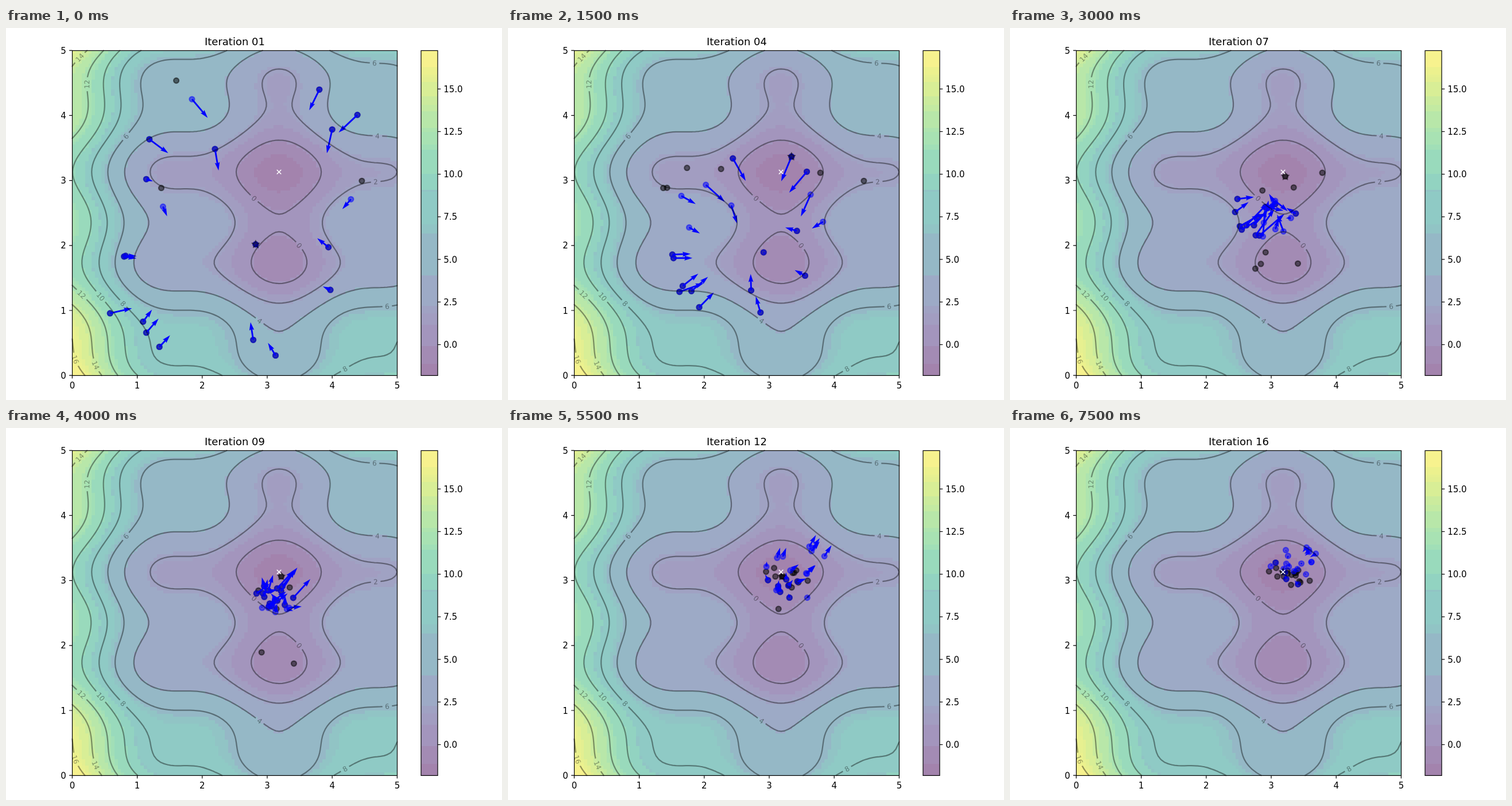
These frames come from a looping animation (864x648 px, 8000 ms). An HTML page with a canvas:

```html
<!DOCTYPE html>
<html lang="en">
<head>
<meta charset="utf-8">
<title>Particle swarm</title>
<style>
  html, body { margin: 0; width: 100%; height: 100%; overflow: hidden; background: #fff; }
  canvas, svg { position: absolute; left: 0; top: 0; display: block; }
  text { font: 15px "DejaVu Sans", sans-serif; fill: #000; }
  #title { font-size: 18px; text-anchor: middle; }
  #labels text { font-size: 12px; text-anchor: middle; fill-opacity: .4; }
  #frame * { fill: none; stroke: #000; stroke-width: 1.2; }
  .dot { fill-opacity: .5; stroke-opacity: .5; stroke-width: 2.25; }
  #best circle { fill: #000; stroke: #000; }
  #swarm circle { fill: #00f; stroke: #00f; }
  #arrows { fill: #00f; }
  #star { stroke: #000; fill-opacity: .4; stroke-opacity: .4; stroke-width: 1.5; stroke-linejoin: bevel; }
  #contours { fill: none; stroke: #000; stroke-opacity: .4; stroke-width: 2.25; stroke-linecap: round; }
  #goal { stroke: #fff; stroke-width: 1.5; }
</style>
</head>
<body>
<canvas id="map" width="864" height="648"></canvas>
<svg width="864" height="648" viewBox="0 0 864 648">
  <mask id="gaps" maskUnits="userSpaceOnUse" x="0" y="0" width="864" height="648">
    <rect width="864" height="648" fill="#fff"/>
  </mask>
  <g id="best"></g>
  <g id="swarm"></g>
  <g id="arrows"></g>
  <path id="star"/>
  <path id="goal"/>
  <path id="contours" mask="url(#gaps)"/>
  <g id="labels"></g>
  <g id="frame"></g>
  <g id="ticks"></g>
  <text id="title" x="398.5" y="30"></text>
</svg>
<script>
const $ = id => document.getElementById(id);
const LEFT = 115.4, BOTTOM = 605.2, SIZE = 566, UNIT = SIZE / 5;
const TOP = BOTTOM - SIZE;
const BAR_X = 723, BAR_W = 29;
const GRID = 100, COUNT = 20, STEPS = 16, STEP_MS = 500;

const px = x => LEFT + x * UNIT;
const py = y => BOTTOM - y * UNIT;
const at = i => i * 5 / (GRID - 1);
const f = (x, y) => (x - 3.14) ** 2 + (y - 2.72) ** 2 + Math.sin(3 * x + 1.41) + Math.sin(4 * y - 1.73);
const gradient = (x, y) => [2 * (x - 3.14) + 3 * Math.cos(3 * x + 1.41), 2 * (y - 2.72) + 4 * Math.cos(4 * y - 1.73)];

function add(parent, tag, attrs, text) {
  const el = document.createElementNS('http://www.w3.org/2000/svg', tag);
  for (const k in attrs) el.setAttribute(k, attrs[k]);
  if (text !== undefined) el.textContent = text;
  return parent.appendChild(el);
}

// Height field and its range
const z = [];
let low = Infinity, high = -Infinity, goal;
for (let j = 0; j < GRID; j++) {
  z.push([]);
  for (let i = 0; i < GRID; i++) {
    const v = f(at(i), at(j));
    z[j].push(v);
    if (v < low) { low = v; goal = [at(i), at(j)]; }
    high = Math.max(high, v);
  }
}

// Viridis as a polynomial, half transparent on white, in coarse colour bands
const VIRIDIS = [
  [0.27773, 0.10509, -0.33086, -4.63423, 6.22827, 4.77638, -5.43546],
  [0.00541, 1.40461, 0.21485, -5.79910, 14.17993, -13.74515, 4.64585],
  [0.33410, 1.38459, 0.09510, -19.33244, 56.69055, -65.35303, 26.31244]
];
function makePalette() {
  const groups = {}, keys = [];
  for (let i = 0; i < 256; i++) {
    const rgb = VIRIDIS.map(c => 127.5 + 127.5 * c.reduceRight((s, k) => s * i / 255 + k, 0));
    const key = rgb.map(v => v >> 4).join();
    (groups[key] = groups[key] || []).push(rgb);
    keys.push(key);
  }
  return keys.map(key => {
    const g = groups[key];
    const mean = [0, 1, 2].map(c => Math.round(g.reduce((s, v) => s + v[c], 0) / g.length));
    return `rgb(${mean})`;
  });
}
const palette = makePalette();
const shade = t => palette[Math.max(0, Math.min(255, Math.floor(t * 256)))];

function drawMap() {
  const ctx = $('map').getContext('2d');
  const cell = SIZE / GRID, edgeX = i => Math.round(LEFT + i * cell), edgeY = j => Math.round(BOTTOM - j * cell);
  for (let j = 0; j < GRID; j++) for (let i = 0; i < GRID; i++) {
    ctx.fillStyle = shade((z[j][i] - low) / (high - low));
    ctx.fillRect(edgeX(i), edgeY(j + 1), edgeX(i + 1) - edgeX(i), edgeY(j) - edgeY(j + 1));
  }
  for (let y = Math.round(TOP); y < BOTTOM; y++) {
    ctx.fillStyle = shade((BOTTOM - y - .5) / SIZE);
    ctx.fillRect(BAR_X, y, BAR_W, 1);
  }
}

// Marching squares
function contourPath(level) {
  let d = '';
  for (let j = 0; j < GRID - 1; j++) for (let i = 0; i < GRID - 1; i++) {
    const corners = [[i, j], [i + 1, j], [i + 1, j + 1], [i, j + 1]], hits = [];
    corners.forEach(([ax, ay], n) => {
      const [bx, by] = corners[(n + 1) % 4], a = z[ay][ax], b = z[by][bx];
      if (a < level === b < level) return;
      const k = (level - a) / (b - a);
      hits.push(px(at(ax + k * (bx - ax))).toFixed(2) + ' ' + py(at(ay + k * (by - ay))).toFixed(2));
    });
    for (let n = 0; n + 1 < hits.length; n += 2) d += `M${hits[n]}L${hits[n + 1]}`;
  }
  return d;
}

// Contour labels: level, x, y
const LABELS = [
  [14, 128, 51], [12, 140, 98], [6, 208, 188], [6, 642, 60], [4, 647, 187], [2, 644, 267],
  [0, 433, 296], [0, 512, 378], [4, 442, 510], [6, 664, 484], [8, 590, 593], [8, 205, 479],
  [10, 166, 467], [12, 133, 463], [14, 157, 587], [16, 122, 577]
];
function drawLabel([level, left, top]) {
  let x = (left - LEFT) / UNIT, y = (BOTTOM - top) / UNIT;
  let [gx, gy] = gradient(x, y);
  const k = (level - f(x, y)) / (gx * gx + gy * gy);
  x += k * gx;
  y += k * gy;
  [gx, gy] = gradient(x, y);
  let angle = Math.atan2(gx, gy) * 180 / Math.PI;
  if (angle >= 88) angle -= 180;
  if (angle < -92) angle += 180;
  const transform = `translate(${px(x)} ${py(y)}) rotate(${angle})`;
  const w = String(level).length * 7.64 + 9;
  add($('gaps'), 'rect', { x: -w / 2, y: -6, width: w, height: 12, transform });
  add($('labels'), 'text', { y: 4.4, transform }, level);
}

function drawAxes() {
  const frame = $('frame'), ticks = $('ticks');
  add(frame, 'rect', { x: 115.5, y: 39.4, width: SIZE, height: SIZE });
  add(frame, 'rect', { x: BAR_X, y: 39.4, width: BAR_W, height: SIZE });
  for (let n = 0; n <= 5; n++) {
    add(frame, 'path', { d: `M${px(n)} ${BOTTOM}v5.25M${LEFT} ${py(n)}h-5.25` });
    add(ticks, 'text', { x: px(n), y: 628.3, 'text-anchor': 'middle' }, n);
    add(ticks, 'text', { x: 104.8, y: py(n) + 5.5, 'text-anchor': 'end' }, n);
  }
  for (let v = 0; v <= 15; v += 2.5) {
    const y = BOTTOM - (v - low) / (high - low) * SIZE;
    add(frame, 'path', { d: `M${BAR_X + BAR_W} ${y}h5.25` });
    add(ticks, 'text', { x: 762.2, y: y + 5.5 }, v.toFixed(1));
  }
}

// Mersenne Twister, with uniform and normal draws
function makeRandom(seed) {
  const mt = new Uint32Array(624);
  let pos = 624, spare = null;
  mt[0] = seed;
  for (let i = 1; i < 624; i++) mt[i] = Math.imul(1812433253, mt[i - 1] ^ (mt[i - 1] >>> 30)) + i;
  function next() {
    if (pos === 624) {
      for (let i = 0; i < 624; i++) {
        const y = (mt[i] & 0x80000000) | (mt[(i + 1) % 624] & 0x7fffffff);
        mt[i] = mt[(i + 397) % 624] ^ (y >>> 1) ^ (y & 1 ? 0x9908b0df : 0);
      }
      pos = 0;
    }
    let y = mt[pos++];
    y ^= y >>> 11;
    y ^= (y << 7) & 0x9d2c5680;
    y ^= (y << 15) & 0xefc60000;
    return (y ^ (y >>> 18)) >>> 0;
  }
  function uniform() {
    const a = next() >>> 5, b = next() >>> 6;
    return (a * 67108864 + b) / 9007199254740992;
  }
  function normal() {
    if (spare !== null) {
      const v = spare;
      spare = null;
      return v;
    }
    let a, b, r;
    do {
      a = 2 * uniform() - 1;
      b = 2 * uniform() - 1;
      r = a * a + b * b;
    } while (r >= 1 || r === 0);
    const k = Math.sqrt(-2 * Math.log(r) / r);
    spare = k * a;
    return k * b;
  }
  return { uniform, normal };
}

// Particle swarm search; returns the state after every iteration
function simulate() {
  const { uniform, normal } = makeRandom(100);
  const row = draw => Array.from({ length: COUNT }, draw);
  const xs = row(() => uniform() * 5), ys = row(() => uniform() * 5);
  const us = row(() => normal() * .1), vs = row(() => normal() * .1);
  const swarm = xs.map((x, i) => ({ pos: [x, ys[i]], vel: [us[i], vs[i]], best: [x, ys[i]], score: f(x, ys[i]) }));
  const leader = () => swarm.reduce((a, b) => b.score < a.score ? b : a).best;
  let top = leader();
  function update() {
    const r1 = uniform(), r2 = uniform();
    for (const p of swarm) {
      p.vel = p.vel.map((v, c) => .8 * v + .1 * r1 * (p.best[c] - p.pos[c]) + .1 * r2 * (top[c] - p.pos[c]));
      p.pos = p.pos.map((v, c) => v + p.vel[c]);
      const score = f(...p.pos);
      if (score <= p.score) {
        p.best = p.pos;
        p.score = score;
      }
    }
    top = leader();
  }
  update();
  return Array.from({ length: STEPS }, () => {
    update();
    return { swarm: swarm.map(p => ({ ...p })), top };
  });
}

// Arrow in units of its shaft width; short ones shrink, tiny ones become a hexagon
const SHAFT = SIZE * .005;
function arrowPath({ pos, vel }) {
  const len = Math.hypot(...vel) * UNIT / SHAFT, angle = Math.atan2(-vel[1], vel[0]);
  let pts;
  if (len < 1) {
    pts = [0, 1, 2, 3, 4, 5].map(i => [Math.cos(i * Math.PI / 3) / 2, Math.sin(i * Math.PI / 3) / 2]);
  } else {
    const l = Math.max(len, 5), s = len / l;
    const half = [[0, .5], [l - 4.5, .5], [l - 5, 1.5]];
    const mirror = half.map(([x, y]) => [x, -y]).reverse();
    pts = [...half, [l, 0], ...mirror].map(([x, y]) => [x * s, y * s]);
  }
  const cos = Math.cos(angle) * SHAFT, sin = Math.sin(angle) * SHAFT;
  return 'M' + pts.map(([x, y]) => [px(pos[0]) + x * cos - y * sin, py(pos[1]) + x * sin + y * cos]).join('L') + 'Z';
}

function starPath([x, y]) {
  const pts = [];
  for (let i = 0; i < 10; i++) {
    const r = i % 2 ? 7.5 * .381966 : 7.5, a = i * Math.PI / 5;
    pts.push([px(x) + r * Math.sin(a), py(y) - r * Math.cos(a)]);
  }
  return 'M' + pts.join('L') + 'Z';
}

drawMap();
let lines = '';
for (let level = 0; level <= 16; level += 2) lines += contourPath(level);
$('contours').setAttribute('d', lines);
LABELS.forEach(drawLabel);
drawAxes();
$('goal').setAttribute('d', `M${px(goal[0]) - 3.75} ${py(goal[1]) - 3.75}l7.5 7.5m0 -7.5l-7.5 7.5`);

const history = simulate();
const dots = id => Array.from({ length: COUNT }, () => add($(id), 'circle', { class: 'dot', r: 4.5 }));
const bestDots = dots('best'), swarmDots = dots('swarm');
const arrows = Array.from({ length: COUNT }, () => add($('arrows'), 'path', {}));

function place(dot, [x, y]) {
  dot.setAttribute('cx', px(x));
  dot.setAttribute('cy', py(y));
}
function show(step) {
  const { swarm, top } = history[step];
  $('title').textContent = 'Iteration ' + String(step + 1).padStart(2, '0');
  swarm.forEach((p, i) => {
    place(bestDots[i], p.best);
    place(swarmDots[i], p.pos);
    arrows[i].setAttribute('d', arrowPath(p));
  });
  $('star').setAttribute('d', starPath(top));
}

const start = performance.now();
let shown = -1;
function tick() {
  const step = Math.floor((performance.now() - start) / STEP_MS) % STEPS;
  if (step !== shown) show(shown = step);
  requestAnimationFrame(tick);
}
tick();
</script>
</body>
</html>
```
